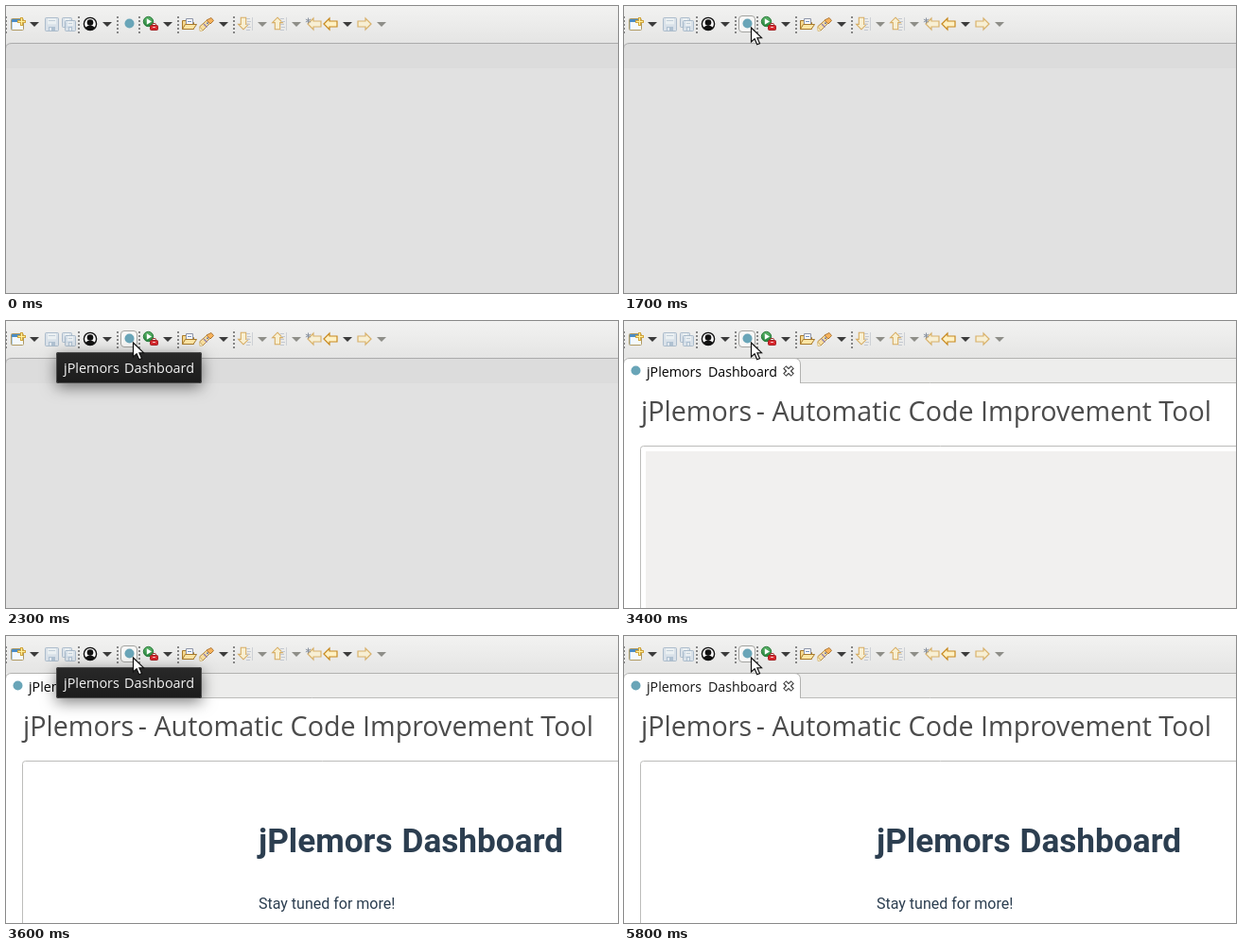
An HTML page with a canvas that plays this animation: 647 px wide and 304 px high, repeating every 5900 ms.

```html
<!DOCTYPE html>
<html lang="en">
<head>
<meta charset="utf-8">
<title>Dashboard</title>
<style>
html, body { margin: 0; width: 100%; height: 100%; overflow: hidden; background: #e1e1e1; }
canvas { display: block; }
</style>
</head>
<body>
<canvas id="stage" width="647" height="304"></canvas>
<script>
const W = 647, H = 304, LOOP = 5900;
const ctx = document.getElementById('stage').getContext('2d');
const NAME = 'jPlemors';
const UI = '"Open Sans", "Noto Sans", sans-serif';
const WEB = 'Roboto, sans-serif';

function box(x, y, w, h, fill) {
  ctx.fillStyle = fill;
  ctx.fillRect(x, y, w, h);
}

function paint(fill, stroke, width = 1) {
  if (fill) { ctx.fillStyle = fill; ctx.fill(); }
  if (stroke) { ctx.strokeStyle = stroke; ctx.lineWidth = width; ctx.stroke(); }
}

function poly(points, fill, stroke, width) {
  ctx.beginPath();
  for (let i = 0; i < points.length; i += 2) ctx.lineTo(points[i], points[i + 1]);
  ctx.closePath();
  paint(fill, stroke, width);
}

function round(x, y, w, h, r, fill, stroke) {
  ctx.beginPath();
  ctx.roundRect(x, y, w, h, r);
  paint(fill, stroke);
}

function disc(x, y, r, fill, stroke, width) {
  ctx.beginPath();
  ctx.arc(x, y, r, 0, Math.PI * 2);
  paint(fill, stroke, width);
}

function line(x1, y1, x2, y2, color, width = 1) {
  ctx.beginPath();
  ctx.moveTo(x1, y1);
  ctx.lineTo(x2, y2);
  paint(null, color, width);
}

function fade(y1, y2, top, bottom) {
  const g = ctx.createLinearGradient(0, y1, 0, y2);
  g.addColorStop(0, top);
  g.addColorStop(1, bottom);
  return g;
}

function at(x, y, draw, alpha = 1) {
  ctx.save();
  ctx.translate(x, y);
  ctx.globalAlpha = alpha;
  draw();
  ctx.restore();
}

function text(str, x, y, font, color, align = 'left') {
  ctx.font = font;
  ctx.fillStyle = color;
  ctx.textAlign = align;
  ctx.fillText(str, x, y);
}

// Product name starts at the left edge, the rest ends at the right edge.
function label(rest, left, right, y, font, color) {
  text(NAME, left, y, font, color);
  text(rest, right, y, font, color, 'right');
}

function handle(x) {
  for (let y = 11; y < 28; y += 4) box(x, y, 2, 2, '#858585');
}

function caret(x, color = '#3b3b3b') {
  poly([x, 17, x + 10, 17, x + 5, 22], color);
}

function newIcon() {
  round(0.5, 1.5, 13, 12, 1, '#f4f9fd', '#b09a62');
  box(1, 2, 12, 3, '#4a8cc4');
  box(1, 5, 1, 8, '#a9c9e2');
  box(10, 0, 3, 9, '#d3a63c');
  box(7, 3, 9, 3, '#d3a63c');
  box(11, 1, 1, 7, '#fff2a0');
  box(8, 4, 7, 1, '#fff2a0');
}

function floppy(s) {
  round(0.5, 0.5, s, s, 1, '#d4dfe9', '#9fb2c5');
  box(3, 1, s - 5, s * 0.45, '#f1f4f6');
  line(4, 3.5, s - 3, 3.5, '#b7c6d2');
  box(4, s - 4, s - 7, 4, '#a5b9cc');
  box(5, s - 3, 2, 3, '#eef3f7');
}

function saveAll() {
  at(0, 0, () => floppy(10), 0.8);
  at(3, 3, () => floppy(11), 0.8);
}

function person() {
  disc(0, 0, 6.6, '#f8f8f8', '#111', 1.4);
  ctx.save();
  ctx.beginPath();
  ctx.arc(0, 0, 6.6, 0, Math.PI * 2);
  ctx.clip();
  disc(0, -1.4, 3.3, '#111');
  ctx.beginPath();
  ctx.ellipse(0, 6, 5.8, 4.2, 0, 0, Math.PI * 2);
  paint('#111');
  ctx.restore();
}

function mark(x, y) {
  disc(x, y, 5, '#69a5b8');
}

function runIcon() {
  disc(5.5, 5.5, 5.2, fade(0, 11, '#5eb66a', '#23813a'), '#2a7a3c');
  poly([3.8, 2.3, 9, 5.5, 3.8, 8.7], '#fff');
  round(9.5, 7.5, 4, 3, 1, null, '#a51f22');
  round(7.5, 9.5, 8, 5, 1, '#d8282d', '#a51f22');
  box(10, 11, 3, 1, '#f6c8c8');
}

function folder() {
  poly([0.5, 12.5, 0.5, 3.5, 5.5, 3.5, 7, 5.5, 12.5, 5.5, 12.5, 12.5], '#f5d78c', '#a87a2c');
  round(4.5, 1.5, 7, 7, 0, '#fdfdff', '#8c94a8');
  line(6, 4.5, 10, 4.5, '#7795c4');
  poly([0.5, 12.5, 3.5, 7.5, 15.5, 7.5, 12, 12.5], '#fce6a6', '#a87a2c');
}

function torch() {
  poly([0.5, 10, 8.5, 3, 11.5, 6.5, 4, 14], '#f8dfa0', '#b58a44');
  poly([8, 3, 13, 0.5, 15.5, 3.5, 12, 7], '#f7b35c', '#b07a3a');
  line(5, 7, 8.5, 10.5, '#9a88b0', 1.6);
  poly([0.5, 10, 4, 14, 1, 14.5], '#fff8dc', '#d9bd80');
  disc(9, 6.3, 1, '#6d73a8');
}

// Arrow pointing left, 15 px wide, centred on the origin.
function arrow() {
  poly([-7, 0, -1, -6, -1, -3, 7, -3, 7, 3, -1, 3, -1, 6], '#fff1c4', '#c88a20', 1.2);
}

function turned(angle, scale) {
  ctx.rotate(angle);
  ctx.scale(scale, scale);
  arrow();
}

function stepIcon(x, angle, side) {
  at(x, 18.5, () => turned(angle, 0.9), 0.65);
  for (let i = 0; i < 5; i++) box(x + side + (i % 2), 13 + i * 3, 4, 1, '#c3c8d0');
  line(x + side + 6.5, 12, x + side + 6.5, 26, '#cdd0d5');
}

function star(x, y) {
  for (let i = 0; i < 3; i++) {
    const a = i * Math.PI / 3 + Math.PI / 6;
    const dx = Math.cos(a) * 3, dy = Math.sin(a) * 3;
    line(x - dx, y - dy, x + dx, y + dy, '#87919f');
  }
}

function toolbar(hover) {
  box(0, 0, W, 39, fade(0, 39, '#f2f2f1', '#e5e5e4'));
  [-1, 76, 117, 140, 181, 240].forEach(handle);
  [25, 102, 166, 225, 356].forEach(x => caret(x));
  [266, 302, 392].forEach(x => caret(x, '#8e8e88'));
  at(5, 12, newIcon);
  at(41, 12, () => floppy(14), 0.8);
  at(59, 12, saveAll);
  at(89, 19, person);
  if (hover) round(121.5, 10.5, 17, 17, 3.5, '#f7f7f6', '#a3a3a0');
  mark(130.5, 18.5);
  at(145, 11, runIcon);
  at(186, 12, folder);
  at(204, 12, torch);
  stepIcon(251, -Math.PI / 2, 3);
  stepIcon(287, Math.PI / 2, 3);
  at(326, 19, arrow, 0.6);
  star(319.5, 15.5);
  at(343, 19, arrow);
  at(379, 19, () => turned(Math.PI, 1), 0.6);
}

function emptyArea() {
  box(0, 39, W, H - 39, '#e1e1e1');
  box(0, 39, W, 1, '#e5e5e4');
  ctx.beginPath();
  ctx.moveTo(-0.5, 66);
  ctx.lineTo(-0.5, 45);
  ctx.quadraticCurveTo(0, 39.5, 6, 39.5);
  ctx.lineTo(W + 1, 39.5);
  ctx.lineTo(W + 1, 66);
  paint('#dcdcdc', '#ababab');
}

function closeMark(x, y) {
  for (const [color, width, r] of [['#333', 4.6, 4.2], ['#fff', 2.3, 3.6]]) {
    line(x - r, y - r, x + r, y + r, color, width);
    line(x - r, y + r, x + r, y - r, color, width);
  }
}

function editor(loaded, tabColor) {
  box(0, 39, W, H - 39, '#fff');
  box(0, 39, W, 27, '#ededec');
  line(0, 65.5, W, 65.5, '#bcbcba');
  line(5, 39.5, W, 39.5, '#b2b2b0');
  ctx.beginPath();
  ctx.moveTo(-0.5, 67);
  ctx.lineTo(-0.5, 45);
  ctx.quadraticCurveTo(0, 39.5, 6, 39.5);
  ctx.lineTo(180, 39.5);
  ctx.quadraticCurveTo(186.5, 39.5, 186.5, 46);
  ctx.lineTo(186.5, 67);
  paint('#fff', '#b2b2b0');
  box(0, 66, W, 2, '#fff');
  mark(12.5, 52.5);
  label('Dashboard', 24, 162, 59, '500 14.2px ' + UI, tabColor);
  closeMark(174, 53);
  label('- Automatic Code Improvement Tool', 18, 621, 106, '28.65px ' + UI, '#4b4b4b');
  round(17.5, 132.5, W, H, 3, '#fff', '#bcbcba');
  if (!loaded) {
    box(23, 138, W, H, '#f1f0ef');
    return;
  }
  label('Dashboard', 267, 589, 229, 'bold 35.2px ' + WEB, '#2c3e50');
  text('Stay tuned for more!', 267, 289, '16px ' + WEB, '#2c3e50');
}

function tooltip() {
  ctx.save();
  ctx.shadowColor = 'rgba(0,0,0,.5)';
  ctx.shadowBlur = 16;
  ctx.shadowOffsetY = 4;
  round(53, 33, 154, 33, 2, '#222');
  ctx.restore();
  round(53.5, 33.5, 153, 32, 2, fade(33, 66, '#292929', '#1b1b1b'), '#4b4b4b');
  label('Dashboard', 61, 199, 55, '14.4px ' + UI, '#f4f4f4');
}

function cursor(x, y) {
  at(x, y, () => poly(
    [1, 1, 1, 16, 4.6, 12.8, 7.2, 18.8, 10, 17.6, 7.4, 11.8, 12, 11.6],
    '#fff', '#111', 1.2));
}

// The pointer slows down as it nears the button, moving ten times a second.
function pointer(t) {
  const left = 1 - Math.min(1, (t - 600) / 1100);
  return [133.5 + 184 * left ** 1.85, 22 + 276 * left ** 1.73];
}

function draw(ms) {
  const t = Math.floor(ms / 100) * 100;
  const open = t >= 3400;
  ctx.clearRect(0, 0, W, H);
  toolbar(t >= 1600);
  if (open) editor(t >= 3500, t >= 5800 ? '#161616' : '#000');
  else emptyArea();
  if ((t >= 2300 && t < 3300) || (t >= 3600 && t < 4500)) tooltip();
  if (t >= 600 && t !== 3300) cursor(...pointer(t));
}

const start = performance.now();
function tick() {
  draw((performance.now() - start) % LOOP);
  requestAnimationFrame(tick);
}
tick();
</script>
</body>
</html>
```
